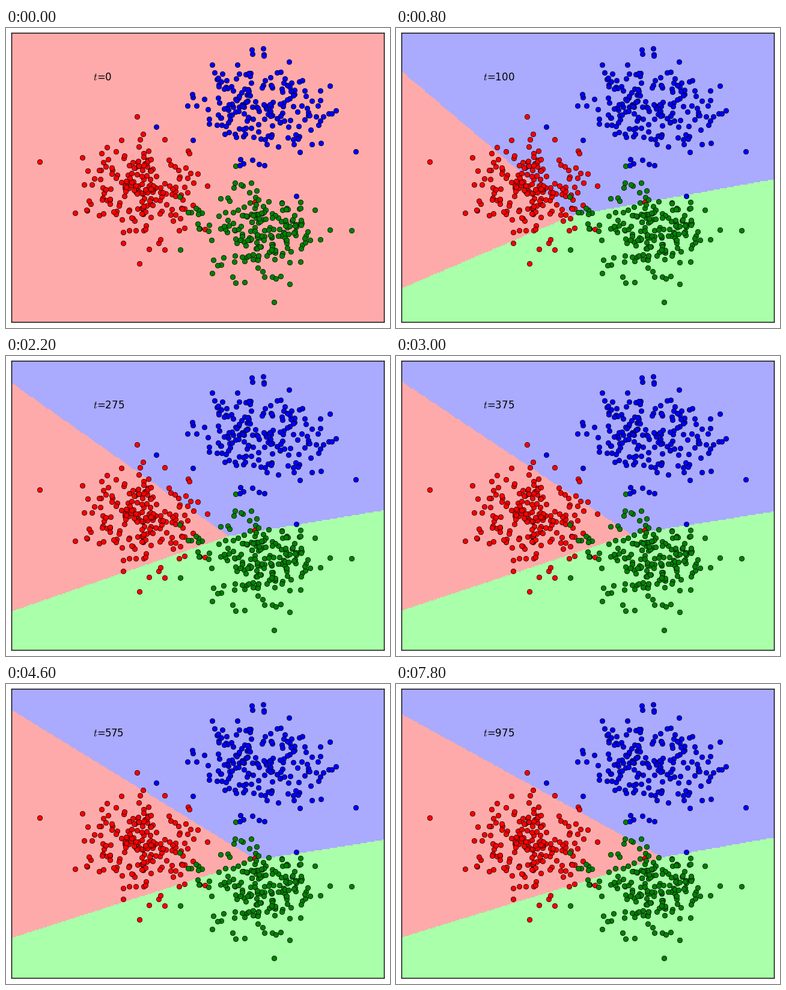
These frames come from a looping animation (639 by 498 pixels, 8000 ms). A matplotlib script:

```python
import numpy as np
import matplotlib.pyplot as plt
from matplotlib.animation import FuncAnimation
from matplotlib.colors import ListedColormap

plt.rcParams["font.family"] = "DejaVu Sans"
plt.rcParams["mathtext.fontset"] = "cm"

W, H, DPI = 639, 498, 100
LEFT, RIGHT, TOP, BOTTOM = 9.5, 629.5, 8.5, 488.5
GRID = 240
N = 200
FRAMES, STEP = 40, 25
RED, GREEN, BLUE = range(3)

rng = np.random.default_rng(7)


def cluster(center, spread, strays):
    """Gaussian cloud without far tails, plus a few chosen strays."""
    z = rng.normal(size=(2 * N, 2))
    cloud = z[np.hypot(*z.T) < 2.4][:N - len(strays)]
    return np.vstack([cloud * spread + center, strays])


reds = cluster((230, 271), (54, 43),
               [(56, 222), (414, 289), (222, 391), (218, 147)])
greens = cluster((422, 344), (58, 39),
                 [(289, 280), (382, 229), (446, 455), (575, 336)])
blues = cluster((424, 134), (55, 42),
                [(250, 164), (483, 279), (582, 205), (310, 110)])

cw, ch = (RIGHT - LEFT) / GRID, (BOTTOM - TOP) / GRID
xx, yy = np.meshgrid(LEFT + cw * (np.arange(GRID) + 0.5),
                     TOP + ch * (np.arange(GRID) + 0.5))


def regions(t):
    """Class of every grid cell after t training steps."""
    if t == 0:
        return np.full((GRID, GRID), RED)

    # Point where the three regions meet
    u = np.log(t / STEP)
    mx = 158 + 109.5 * u - 8.6 * u**2
    my = 333.5 - 17.5 * u + 1.4 * u**2

    def border(x_end, y_end):
        return my + (y_end - my) * (xx - mx) / (x_end - mx)

    upper = border(LEFT, 19.6 + 4955 / t + 0.026 * t)
    lower = border(LEFT, 419.8 + 1300 / t)
    right = border(RIGHT, 266 - 0.011 * t - 15 * np.exp(-(t / 302)**2))
    west = np.where(yy < upper, BLUE, np.where(yy > lower, GREEN, RED))
    east = np.where(yy < right, BLUE, GREEN)
    return np.where(xx < mx, west, east)


fig = plt.figure(figsize=(W / DPI, H / DPI), dpi=DPI, facecolor="white")
ax = fig.add_axes([9 / W, 10 / H, 620 / W, 480 / H])
ax.set_xticks([])
ax.set_yticks([])
for spine in ax.spines.values():
    spine.set_linewidth(1.0)

field = ax.imshow(regions(0), cmap=ListedColormap(["#ffaaaa", "#aaffaa", "#aaaaff"]),
                  vmin=0, vmax=2, interpolation="nearest", aspect="auto",
                  extent=(LEFT, RIGHT, BOTTOM, TOP))
for pts, color in ((reds, "r"), (greens, "g"), (blues, "b")):
    ax.plot(*pts.T, "o", color=color, ms=6, mec="k", mew=0.5)
label = ax.text(145.5, 87, "", fontsize=12, va="baseline")
ax.set_xlim(LEFT, RIGHT)
ax.set_ylim(BOTTOM, TOP)


def draw(i):
    t = i * STEP
    field.set_data(regions(t))
    label.set_text(f"$t$={t}")
    return field, label


anim = FuncAnimation(fig, draw, frames=FRAMES, interval=200, repeat=True)
plt.show()
```
